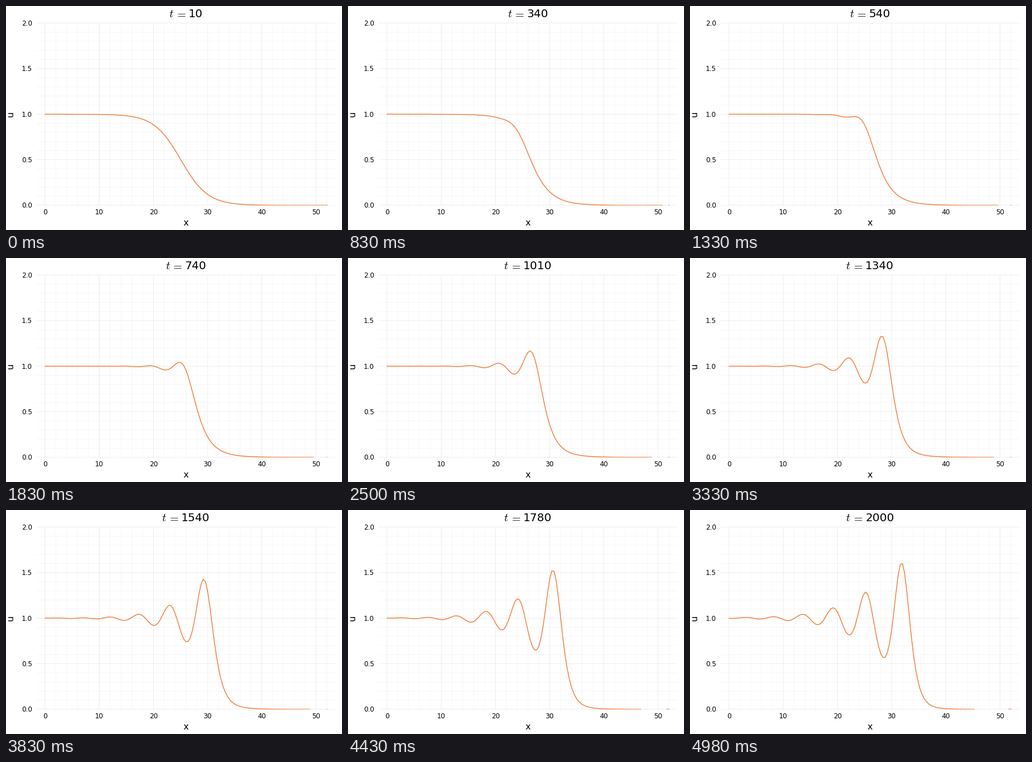
A matplotlib script for the animation above (5.01 s loop, 600 by 400 pixels).

```python
import numpy as np
import matplotlib.pyplot as plt
from matplotlib.animation import FuncAnimation
from matplotlib.collections import LineCollection
from matplotlib.patches import Rectangle

W, H, DPI = 600, 400, 100
LEFT, RIGHT, TOP, BOTTOM = 54.6, 588.1, 30.6, 355.9
CENTER = (LEFT + RIGHT) / 2
LENGTH, PAD = 52, 1.56
PT = 72 / DPI

# Korteweg-de Vries equation, leapfrog in time
EPS, MU, DX, DT = 0.2, 0.1, 0.4, 0.05
STEPS, STRIDE = 2000, 10


def px(x):
    return LEFT + (x + PAD) * (RIGHT - LEFT) / (LENGTH + 2 * PAD)


def py(u):
    return BOTTOM - u * (BOTTOM - TOP) / 2


def rate(u):
    """Change over one step of length DT, zero at both ends."""
    d = np.zeros_like(u)
    diff = u[2:] - u[:-2]
    third = -diff
    third[1:-1] = u[4:] - 2 * u[3:-1] + 2 * u[1:-3] - u[:-4]
    mean = (u[2:] + u[1:-1] + u[:-2]) / 3
    d[1:-1] = -EPS * DT / (2 * DX) * mean * diff - MU * DT / (2 * DX**3) * third
    return d


def solve(x):
    prev = 0.5 * (1 - np.tanh((x - 25) / 5))
    prev[0], prev[-1] = 1, 0
    cur = prev + rate(prev)
    waves = []
    for step in range(2, STEPS + 1):
        prev, cur = cur, prev + 2 * rate(cur)
        if step % STRIDE == 0:
            waves.append(cur)
    return waves


x = np.linspace(0, LENGTH, 131)
waves = solve(x)

plt.rcParams["font.family"] = "DejaVu Sans"
plt.rcParams["mathtext.fontset"] = "cm"
fig = plt.figure(figsize=(W / DPI, H / DPI), dpi=DPI, facecolor="white")
ax = fig.add_axes([0, 0, 1, 1])
ax.set(xlim=(0, W), ylim=(H, 0))
ax.axis("off")


def grid(xs, us, alpha):
    lines = [[(px(v), TOP), (px(v), BOTTOM)] for v in xs]
    lines += [[(LEFT, py(v)), (RIGHT, py(v))] for v in us]
    ax.add_collection(LineCollection(lines, colors=[(0, 0, 0, alpha)],
                                     linewidths=0.5, snap=False))


def label(x, y, text, size, **kw):
    return ax.text(x, y, text, fontsize=size * PT, **{"ha": "center", "va": "baseline", **kw})


grid([v for v in range(0, 53, 2) if v % 10],
     [k / 10 for k in range(21) if k % 5], 0.05)
grid(range(0, 51, 10), np.arange(0, 2.1, 0.5), 0.1)
for v in range(0, 51, 10):
    label(px(v), 371.5, str(v), 12)
for v in np.arange(0, 2.1, 0.5):
    label(47, py(v) + 4.3, f"{v:.1f}", 12, ha="right")
label(CENTER, 392, "x", 16)
label(16, py(1), "u", 16, rotation=90, ha="right", va="center")

var = label(0, 20, "$t$", 20, ha="left")
equals = label(0, 20, "$=$", 20)
count = label(0, 20, "", 20, ha="left")

curve, = ax.plot([], [], color="#EE7733", lw=1, solid_joinstyle="round")
curve.set_clip_path(Rectangle((LEFT, TOP), RIGHT - LEFT, BOTTOM - TOP,
                              transform=ax.transData))


def draw(tick):
    # states last 30 and 20 ms in turn
    n = min(2 * (tick // 5) + (tick % 5 >= 3), len(waves) - 1)
    u = np.where(waves[n] < 0, np.nan, waves[n])
    curve.set_data(px(np.r_[x, np.nan, LENGTH - 0.05, LENGTH]),
                   py(np.r_[u, np.nan, 0, 0]))
    text = str((n + 1) * STRIDE)
    start = CENTER - (34.8 + 12.73 * len(text)) / 2
    var.set_x(start)
    equals.set_x(start + 20.6)
    count.set_x(start + 34.8)
    count.set_text(text)
    return curve, var, equals, count


anim = FuncAnimation(fig, draw, frames=501, interval=10, repeat=True)
plt.show()
```
